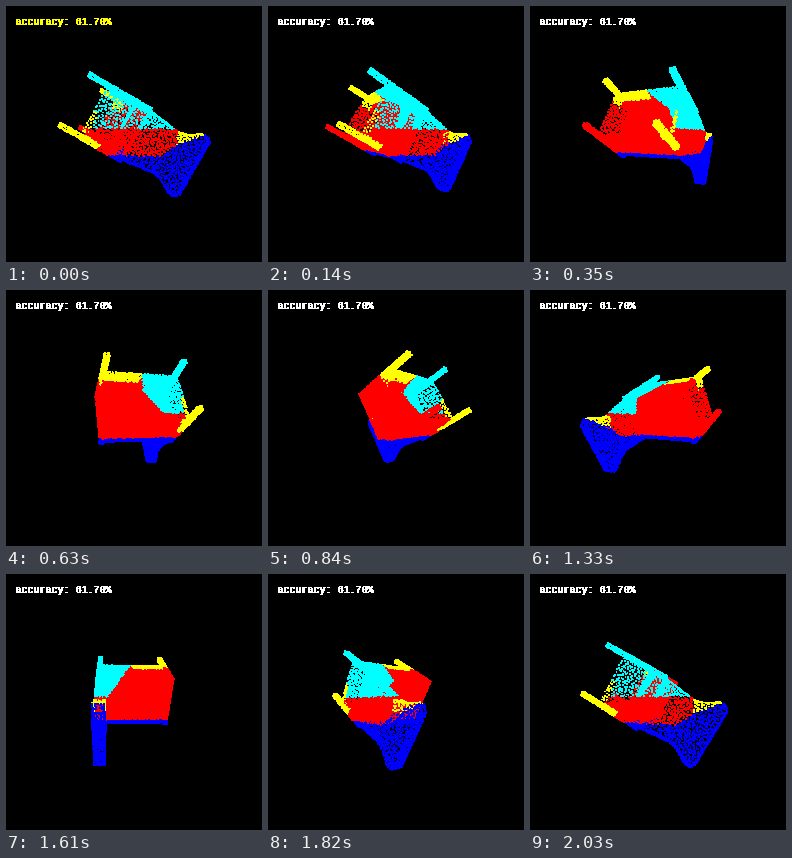
Recreate the animation shown at these times as a matplotlib script. Size 256 by 256 pixels, loop 2100 ms.

```python
import numpy as np
import matplotlib.pyplot as plt
from matplotlib.animation import FuncAnimation

SIZE, FRAMES = 256, 30
FOCAL = SIZE / 2 / np.tan(np.radians(30))
TILT = np.radians(30)
COLORS = np.array(["#ff0000", "#00ffff", "#ffff00", "#0000ff"])
RED, CYAN, YELLOW, BLUE = range(4)

rng = np.random.default_rng(4)


def grid(a0, a1, b0, b1, step):
    """Jittered lattice over a rectangle."""
    na = max(2, round((a1 - a0) / step) + 1)
    nb = max(2, round((b1 - b0) / step) + 1)
    a, b = np.meshgrid(np.linspace(a0, a1, na), np.linspace(b0, b1, nb))
    a[1::2] += step / 2 * (na > 3)
    a = a + rng.uniform(-0.35, 0.35, a.shape) * step
    b = b + rng.uniform(-0.35, 0.35, b.shape) * step
    return np.clip(a, a0, a1).ravel(), np.clip(b, b0, b1).ravel()


def box(u0, u1, v0, v1, z0, z1, steps, floor=None):
    """Faces in chair axes: u up the back, v across, z depth.

    A floor above u0 leaves the underside hollow up to that height.
    """
    su, sv, sz = steps
    parts = []
    for u in (u0 if floor is None else floor, u1):
        v, z = grid(v0, v1, z0, z1, su)
        parts.append(np.c_[np.full(v.size, u), v, z])
    for v in (v0, v1):
        u, z = grid(u0, u1, z0, z1, sv)
        parts.append(np.c_[u, np.full(u.size, v), z])
    for z in (z0, z1):
        u, v = grid(u0, u1, v0, v1, sz)
        parts.append(np.c_[u, v, np.full(u.size, z)])
    return np.vstack(parts)


def half_width(u):
    return np.interp(u, [2, 20, 31, 38, 45, 50, 54, 57, 58.5],
                     [24, 21.5, 20, 21.5, 25.5, 28.5, 29, 27.5, 25])


def backrest(z0, z1):
    parts = []
    for z in (z0, z1):
        u, v = grid(2, 58.5, -30, 30, 2.3)
        keep = np.abs(v) <= half_width(u)
        parts.append(np.c_[u, v, np.full(u.size, z)][keep])
    for side in (-1, 1):
        u, z = grid(2, 58.5, z0, z1, 1.7)
        parts.append(np.c_[u, side * half_width(u), z])
    v, z = grid(-25, 25, z0, z1, 1.7)
    parts.append(np.c_[np.full(v.size, 58.5), v, z])
    return np.vstack(parts)


def chair():
    parts = [box(-39, 2, -23.5, 24, -36, 36, (1.4, 1.5, 2.3), floor=-12),
             backrest(28, 36.5)]
    for v in (-24.5, 24.5):
        for z in (-34.5, 34.5):
            parts.append(box(-58, 2, v - 1.7, v + 1.7, z - 1.8, z + 1.8,
                             (1.6, 1.8, 1.8)))
    return np.vstack(parts)


def label(u, v, x, y, z):
    """Segment colour from position."""
    out = np.full(u.size, RED)
    out[(y < -4.5) & (z > 0.75 * (y + 40))] = CYAN
    out[(u < -27) & (v < -14) & (z < 1)] = YELLOW
    out[(u < -34) & (v > 0) & (z > 28)] = YELLOW
    out[(u < -20) & (v > 21) & (z > 31)] = YELLOW
    edge = np.interp(x, [-10, 22, 31, 37], [18, 19, 14, 8])
    out[(y > edge) | (x > 37)] = BLUE
    out[(x > 37) & (y < 9 - 0.35 * (x - 37)) & (u < 52)] = YELLOW
    return out


u, v, Z = chair().T
X = u * np.cos(TILT) - v * np.sin(TILT)
Y = u * np.sin(TILT) + v * np.cos(TILT)
paint = COLORS[label(u, v, X, Y, Z)]

plt.rcParams["text.antialiased"] = False
fig = plt.figure(figsize=(SIZE / 100, SIZE / 100), dpi=100, facecolor="black")
ax = fig.add_axes([0, 0, 1, 1])
ax.set(xlim=(0, SIZE), ylim=(SIZE, 0))
ax.axis("off")
dots = ax.scatter(X, Y, s=(1.9 * 0.72) ** 2, c=paint, marker="s",
                  linewidths=0, antialiased=False)
# Struck twice, one pixel apart, for a heavy terminal face.
texts = [ax.text(x, 19, "accuracy: 61.70%", family="Liberation Mono",
                 weight="bold", size=7.2, va="baseline") for x in (9, 10)]


def draw(i):
    t = 2 * np.pi * i / FRAMES
    x = X * np.cos(t) + Z * np.sin(t)
    z = Z * np.cos(t) - X * np.sin(t)
    k = FOCAL / (FOCAL - z)
    order = np.argsort(z)
    dots.set_offsets((np.c_[x * k, Y * k] + SIZE / 2)[order])
    dots.set_facecolor(paint[order])
    for text in texts:
        text.set_color("white" if i else "yellow")
    return dots, *texts


anim = FuncAnimation(fig, draw, frames=FRAMES, interval=70, repeat=True,
                     repeat_delay=0, init_func=lambda: draw(0))
plt.show()
```
